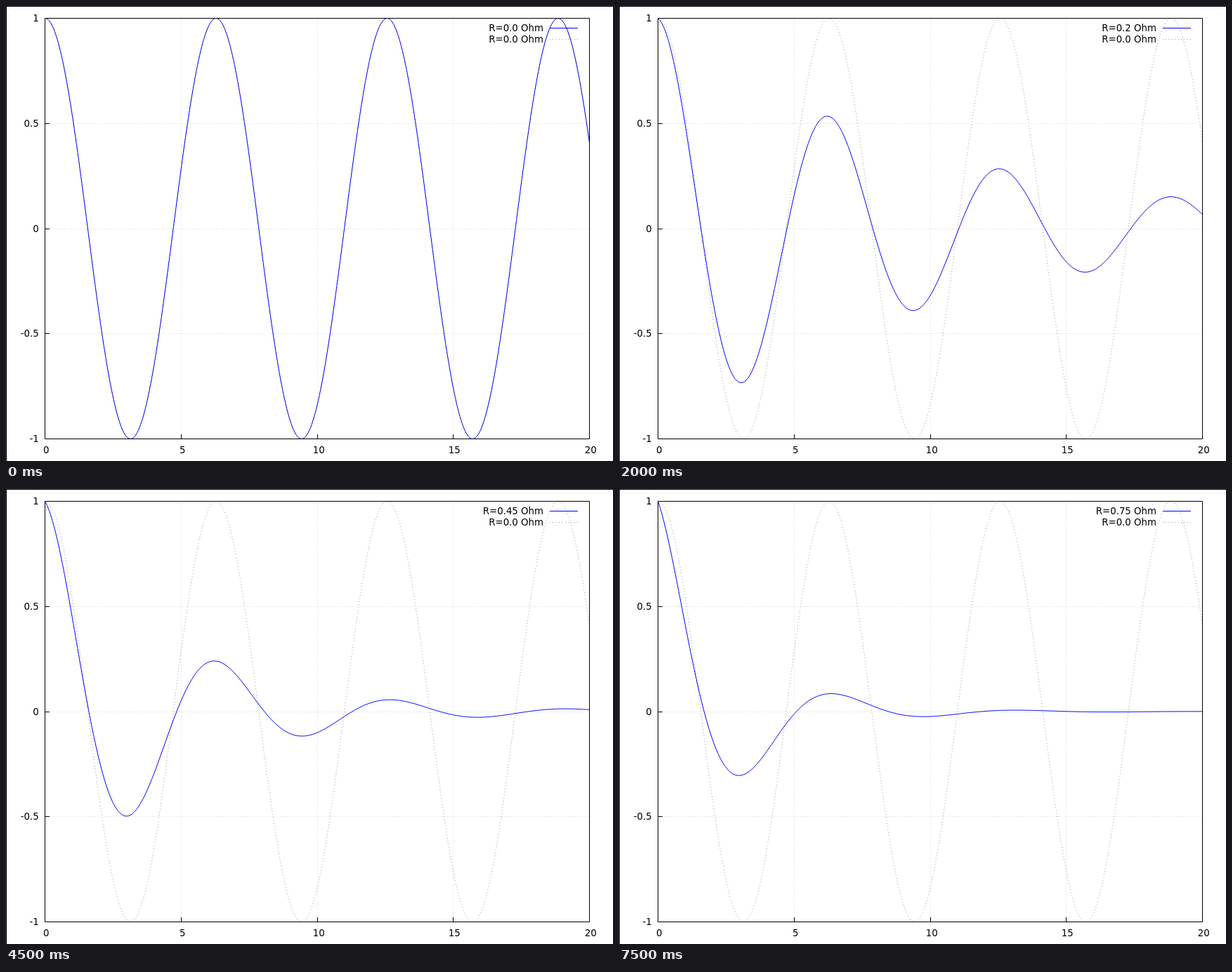
Animation of 864x648 px, one loop 8000 ms. Source, as an HTML page:

```html
<!DOCTYPE html>
<html lang="en">
<head>
<meta charset="utf-8">
<title>Damped oscillation</title>
<style>
  html, body { margin: 0; width: 100%; height: 100%; overflow: hidden; background: #fff; }
  svg { display: block; width: 864px; height: 648px; }
  path { fill: none; stroke: #000; stroke-width: 1; }
  text { font: 13.333px "DejaVu Sans", sans-serif; fill: #000; }
  .end { text-anchor: end; }
  .mid { text-anchor: middle; }
  .grid { stroke-width: .5; stroke-dasharray: .3 2.83; }
  .dots { stroke-dasharray: .4 4; }
  .wave { stroke: #00f; }
</style>
</head>
<body>
<svg viewBox="0 0 864 648">
  <path d="M0 .5H864M.5 0V648"/>
  <path id="grid" class="grid"/>
  <text id="label" class="end" x="765" y="36"></text>
  <path class="wave" d="M774 31.5H814"/>
  <path id="wave" class="wave"/>
  <text class="end" x="765" y="52">R=0.0 Ohm</text>
  <path class="dots" d="M774 47.5H814"/>
  <path id="ideal" class="dots"/>
  <path id="ticks"/>
  <path d="M55.5 17.5H830.5V616.5H55.5Z"/>
  <g id="scale"></g>
</svg>
<script>
  const LEFT = 55.5, RIGHT = 830.5, TOP = 17.5, BOTTOM = 616.5;
  const STEP_MS = 500, STEPS = 16, SAMPLES = 500;
  const $ = id => document.getElementById(id);
  const px = t => LEFT + t / 20 * (RIGHT - LEFT);
  const py = v => (TOP + BOTTOM) / 2 - v * (BOTTOM - TOP) / 2;
  const snap = n => Math.floor(n) + 0.5;

  // Series RLC circuit with L = C = 1
  function curve(r) {
    const decay = r / 2, omega = Math.sqrt(1 - decay * decay);
    let d = "";
    for (let i = 0; i <= SAMPLES; i++) {
      const t = 20 * i / SAMPLES;
      const v = Math.exp(-decay * t) * Math.cos(omega * t);
      d += (i ? "L" : "M") + px(t).toFixed(2) + " " + py(v).toFixed(2);
    }
    return d;
  }

  function drawAxes() {
    let grid = "", ticks = "", labels = "";
    for (let t = 0; t <= 20; t += 5) {
      const x = snap(px(t));
      labels += `<text class="mid" x="${x + 1.8}" y="637">${t}</text>`;
      ticks += `M${x} ${BOTTOM}v-6.5`;
      if (t > 0 && t < 20) grid += `M${x} ${BOTTOM}V${TOP}`;
    }
    for (let v = -1; v <= 1; v += 0.5) {
      const y = snap(py(v));
      labels += `<text class="end" x="46.8" y="${y + 4.5}">${v}</text>`;
      ticks += `M${LEFT} ${y}h6.5`;
      if (Math.abs(v) < 1) grid += `M${LEFT} ${y}H${RIGHT}`;
    }
    $("grid").setAttribute("d", grid);
    $("ticks").setAttribute("d", ticks);
    $("scale").innerHTML = labels;
  }

  let shown = -1;
  function draw(now) {
    const step = Math.floor(now / STEP_MS) % STEPS;
    if (step !== shown) {
      shown = step;
      const r = step * 5 / 100;
      $("wave").setAttribute("d", curve(r));
      $("label").textContent = `R=${step ? r : "0.0"} Ohm`;
    }
  }

  function loop() {
    draw(performance.now() - start);
    requestAnimationFrame(loop);
  }

  drawAxes();
  $("ideal").setAttribute("d", curve(0));
  const start = performance.now();
  loop();
</script>
</body>
</html>
```
